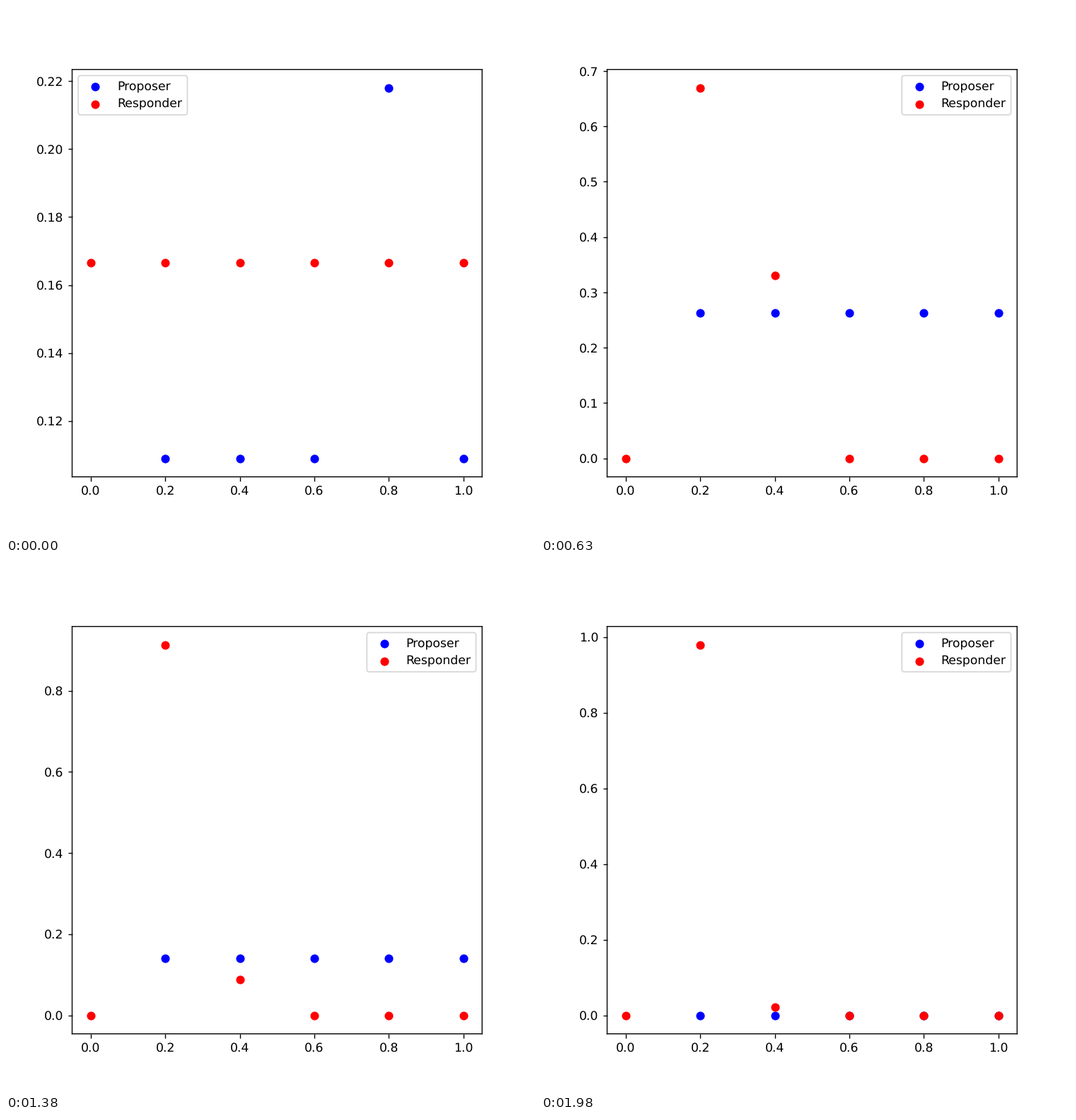
These frames come from a looping animation (748 by 748 pixels, 8 s). A matplotlib script:

```python
import numpy as np
import matplotlib.pyplot as plt
from matplotlib.animation import FuncAnimation

SIZE = 748
LOOP, TICK, STEP = 8000, 20, 30  # ms
LAST = 66                        # the final state is held

SHARES = np.linspace(0, 1, 6)
START = .109 * np.array([1, 1, 1, 2, 1])
RISE = np.array([.014, .0205, .0205, .0205, .0205])
COST = np.array([4.4, 0, 1, 2.9, 4.8, 6.7])  # handicap of each responder

plt.rcParams.update({"path.snap": False, "text.hinting": "no_hinting"})


def proposers(k):
    """Climb at a steady rate up to a common level that sinks to zero."""
    level = (LAST - k) * (.0071 - 1.15e-6 * (k - 54) ** 2)
    return np.minimum(START + RISE * k, level)


def pressure(k):
    """Selection built up by step k, driven by the lowest offer."""
    mid = np.arange(k) + .5
    return sum(.0935 * (1 - np.exp(-t / 6.5)) * proposers(t)[0] for t in mid)


def responders(k):
    """Project the handicaps onto shares that are >= 0 and sum to 1."""
    loss = pressure(k) * COST
    ranked = np.sort(loss)
    tops = (1 + np.cumsum(ranked)) / np.arange(1, len(loss) + 1)
    top = tops[tops > ranked][-1]
    return np.maximum(top - loss, 0)


fig, ax = plt.subplots(figsize=(6, 6), dpi=SIZE / 6)
shown = None


def update(frame):
    global shown
    k = min(round(frame * TICK / STEP), LAST)
    if k == shown:
        return
    shown = k
    ax.clear()
    ax.scatter(SHARES[1:], proposers(k), color="blue", label="Proposer")
    ax.scatter(SHARES, responders(k), color="red", label="Responder")
    ax.legend()


anim = FuncAnimation(fig, update, frames=LOOP // TICK, interval=TICK,
                     repeat=True, repeat_delay=0)
plt.show()
```
